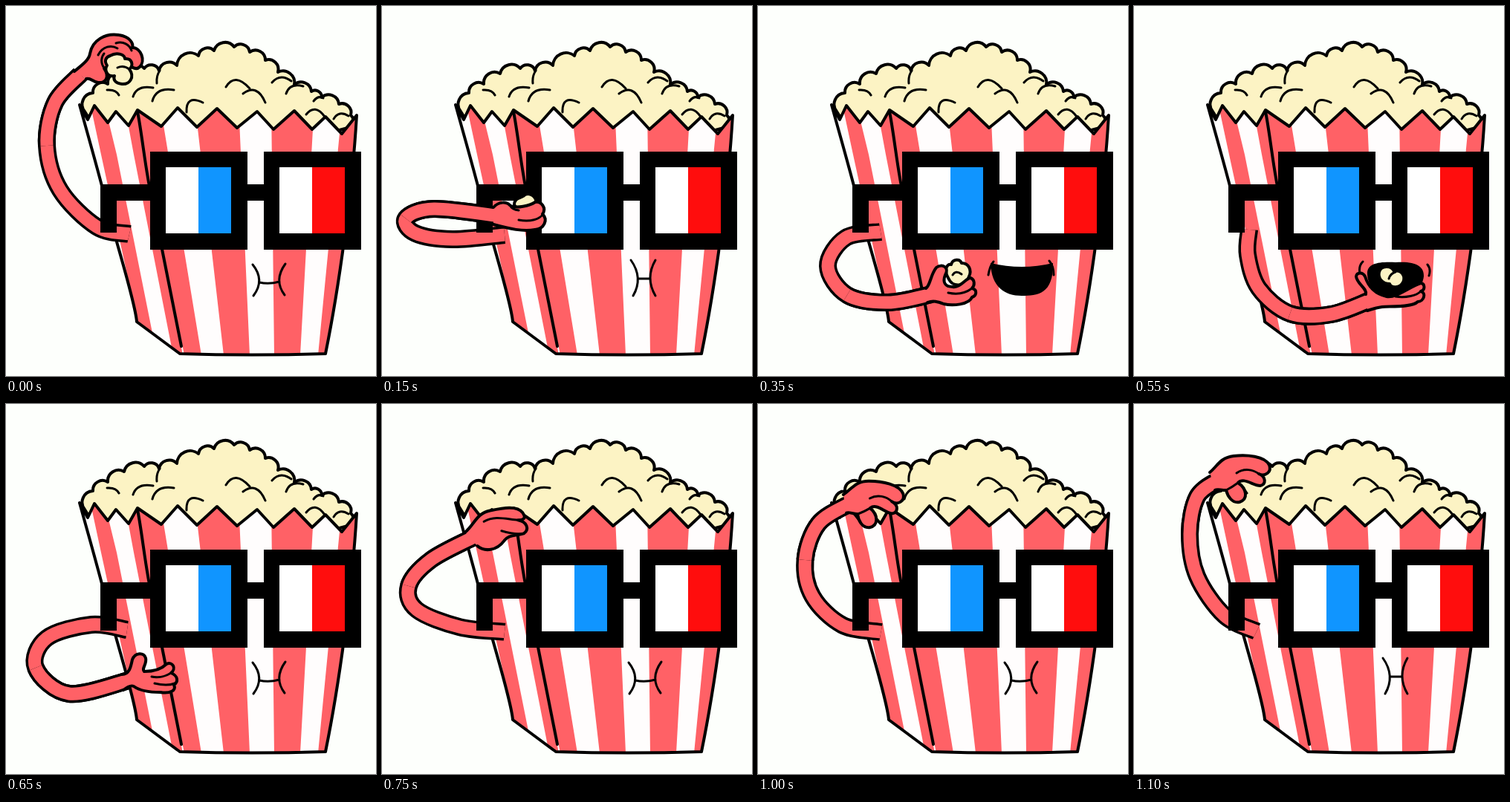
These frames come from a looping animation (498 by 498 pixels, 1.15 s). An HTML page:

```html
<!DOCTYPE html>
<html lang="en">
<head>
<meta charset="utf-8">
<title>Popcorn snack</title>
<style>
html, body { margin: 0; width: 100%; height: 100%; overflow: hidden; background: #fdfffc; }
svg { display: block; width: 100vw; height: 100vh; }
.ink { fill: none; stroke: #000; stroke-width: 4; stroke-linecap: round; stroke-linejoin: round; }
.fine { stroke-width: 3; }
.pink { fill: #ff6166; }
.corn { fill: #fcf3c4; }
.limb { fill: none; stroke: #ff6166; stroke-width: 17; }
.edge { fill: none; stroke: #000; stroke-width: 24; }
</style>
</head>
<body>
<svg viewBox="0 0 498 498">
  <defs>
    <clipPath id="box"><path id="boxShape" d="M99 133L110 153L119 134L137 157L148 142L165 161L177 140L209 162L231 137L257 163L284 138L311 164L338 142L360 166L388 141L412 166L430 149L452 172L472 147C466 250 448 380 430 468Q330 471 234 468L176 425C174 400 152 330 140 285C128 235 112 180 99 133Z"/></clipPath>
  </defs>
  <path id="pile" class="ink corn"/>
  <path class="ink fine" d="M136 113Q148 112 152 120M171 122Q176 106 198 110M197 128Q202 109 226 113M203 104Q202 94 207 87M296 109Q308 89 328 111M319 118Q338 104 349 130M358 103Q369 90 384 101M377 118Q382 103 400 108M243 143Q242 119 265 130M404 146Q416 131 429 149M414 128Q420 120 427 124M441 152Q448 140 461 148"/>
  <g clip-path="url(#box)">
    <path fill="#fffdfd" d="M90 120H480V480H90Z"/>
    <path class="pink" d="M113 130L128 200L178 430L198 445L149 200L132 130ZM159 130L172 200L224 465L240 470L197 255L177 130ZM177 130H207L263 470H238L197 255ZM254 130H313L328 470H293ZM357 130H415L396 470H361ZM453 130H480V470H420Z"/>
  </g>
  <use href="#boxShape" class="ink"/>
  <path class="ink" d="M177 142C184 178 188 225 197 262L236 458"/>
  <path id="lips" class="ink fine"/>
  <path id="mouth"/>
  <path class="edge" id="armEdge"/><path class="limb" id="arm"/>
  <g id="glasses">
    <path d="M127 240H194V196H325V240H347V196H478V328H347V262H325V328H194V262H149V305H127Z"/>
    <path fill="#fff" d="M215 217H259V306H215ZM368 217H412V306H368Z"/>
    <path fill="#1095ff" d="M259 217H303V306H259Z"/>
    <path fill="#ff0d0d" d="M412 217H456V306H412Z"/>
  </g>
  <path class="edge" id="foreEdge"/><path class="limb" id="fore"/>
  <g id="hand">
    <path id="snackBack" class="ink corn"/>
    <path id="palm" class="ink pink"/>
    <path id="snackFront" class="ink corn"/>
    <path id="creases" class="ink fine"/>
  </g>
</svg>
<script>
const STEP = 50, STEPS = 23;
const part = id => document.getElementById(id);
const draw = (id, d) => part(id).setAttribute('d', d || '');

// Rounded bumps along the top of the popcorn pile.
const bumps = [[117, 117], [137, 105], [159, 91], [186, 84], [206, 87], [230, 80], [259, 67], [280, 60],
  [307, 55], [328, 62], [349, 73], [366, 89], [388, 106], [411, 115], [425, 123], [448, 132], [464, 147], [460, 164]];
let last = [106, 142];
draw('pile', 'M106 142' + bumps.map(p => {
  const r = Math.hypot(p[0] - last[0], p[1] - last[1]) * 0.56;
  last = p;
  return `A${r} ${r} 0 0 1 ${p}`;
}).join('') + 'L400 180L120 165Z');

// Arm centre line from shoulder to wrist, at each key step.
const poses = [
  [0, [166, 307, 122, 297, 73, 248, 55, 188, 66, 130, 100, 92]],
  [3, [165, 308, 95, 314, 45, 306, 32, 286, 70, 273, 160, 283]],
  [7, [165, 304, 118, 312, 94, 350, 120, 389, 175, 399, 234, 388]],
  [11, [155, 301, 153, 335, 168, 380, 210, 414, 265, 415, 318, 396]],
  [13, [163, 304, 115, 297, 55, 315, 40, 355, 85, 390, 165, 372]],
  [16, [166, 308, 100, 302, 43, 258, 34, 190, 56, 120, 100, 84]],
  [18, [166, 308, 105, 310, 62, 286, 52, 245, 78, 197, 135, 165]],
  [22, [165, 306, 122, 285, 85, 232, 75, 175, 85, 125, 112, 103]],
  [23, [166, 307, 122, 297, 73, 248, 55, 188, 66, 130, 100, 92]]
];

// Each hand is drawn for one key pose and follows the wrist from there.
const hands = [
  { until: 1, pose: 0,
    palm: 'M92 88C104 78 112 72 113 64C116 46 134 36 152 39C166 41 172 50 170 56C182 56 188 74 180 82C174 88 166 80 162 76L132 84C140 96 134 104 124 103C116 102 114 96 108 98',
    front: 'M140 67C150 61 160 66 160 71C170 70 172 80 166 85C174 96 166 106 156 105C146 104 144 98 146 94C136 96 132 86 136 80C132 74 134 69 140 67Z',
    creases: 'M124 66C130 54 142 52 150 57M148 50C158 47 166 52 169 60M132 64C126 72 129 81 134 85M150 83Q158 79 166 85' },
  { until: 4, pose: 1,
    palm: 'M150 271C158 262 168 264 172 268C180 274 200 268 206 264C214 262 222 272 216 280C224 288 218 300 206 301C190 304 172 300 150 294',
    back: 'M178 268C178 258 186 259 190 256C196 250 206 254 208 264C204 274 186 278 178 268Z',
    creases: 'M184 288C200 291 212 287 217 280M172 268Q175 274 184 275' },
  { until: 8, pose: 2,
    palm: 'M226 380C232 376 232 362 240 352C248 346 258 352 252 362C248 372 252 378 262 378C272 380 280 366 286 366C292 368 292 376 288 380C296 382 294 390 288 392C284 402 262 404 250 401C242 398 236 396 228 399',
    back: 'M256 366C250 356 254 346 260 348C262 340 272 340 274 346C284 346 288 356 284 364C280 378 262 380 256 366Z',
    creases: 'M256 386C270 389 280 386 288 380M262 362Q266 355 274 361' },
  { until: 11, pose: 3,
    palm: 'M312 388C314 380 300 374 299 364C300 358 308 358 311 364C316 380 326 388 340 391C352 394 374 376 386 373C392 374 392 382 386 384C394 386 390 398 382 398C374 406 344 404 334 405C326 406 320 408 314 410',
    back: 'M330 358C332 350 346 348 350 357C360 354 366 364 362 372C358 380 346 380 344 374C334 374 328 366 330 358Z',
    creases: 'M352 391C366 393 380 390 386 384M343 367Q345 360 352 358' },
  { until: 14, pose: 4,
    palm: 'M156 364C166 364 168 354 170 344C174 334 186 334 188 342C190 350 182 356 186 360C196 360 208 358 216 350C224 346 230 356 222 362C232 366 232 374 226 378C230 386 220 390 208 388C192 388 180 386 172 380C168 378 164 380 158 385',
    creases: 'M196 367C206 369 216 366 222 362M200 376C212 379 222 378 227 376' },
  { until: 19, pose: 6,
    palm: 'M125 158C138 146 140 132 158 128C176 124 194 120 202 130C208 138 202 140 196 140C208 142 212 152 204 158C190 162 184 160 178 168C168 182 152 184 142 176',
    creases: 'M150 143C164 134 180 139 196 140M174 155C188 159 198 159 204 158' },
  { until: 22, pose: 7,
    palm: 'M102 92C112 84 116 72 134 70C152 68 176 70 182 82C186 92 176 98 168 94C178 98 178 108 170 110C160 110 148 98 140 106C152 114 154 128 142 132C132 134 126 124 124 116C116 116 112 114 109 116',
    creases: 'M138 93C148 86 160 88 168 94M124 116Q132 112 140 106' }
];

function armAt(step) {
  const k = poses.findIndex(p => p[0] > step);
  const [a, from] = poses[k - 1], [b, to] = poses[k];
  const u = (step - a) / (b - a);
  return from.map((v, i) => v + (to[i] - v) * u);
}

// Smooth curve through the points, returned as cubic segments.
function curve(flat) {
  const at = i => { const j = 2 * Math.max(0, Math.min(5, i)); return [flat[j], flat[j + 1]]; };
  return [0, 1, 2, 3, 4].map(i => {
    const [p, q, r, s] = [at(i - 1), at(i), at(i + 1), at(i + 2)];
    return 'C' + [0, 1].map(n => q[n] + (r[n] - p[n]) / 6) + ' ' +
      [0, 1].map(n => r[n] - (s[n] - q[n]) / 6) + ' ' + r;
  });
}

const wristAngle = a => Math.atan2(a[11] - a[9], a[10] - a[8]) * 180 / Math.PI;

function drawArm(step) {
  const a = armAt(step), segments = curve(a);
  const whole = `M${a[0]} ${a[1]}` + segments.join('');
  const front = `M${a[6]} ${a[7]}` + segments.slice(3).join('');
  draw('armEdge', whole); draw('arm', whole);
  draw('foreEdge', front); draw('fore', front);

  const h = hands.find(v => step <= v.until), home = poses[h.pose][1];
  draw('palm', h.palm); draw('creases', h.creases);
  draw('snackBack', h.back); draw('snackFront', h.front);
  part('hand').setAttribute('transform',
    `translate(${a[10]} ${a[11]}) rotate(${wristAngle(a) - wristAngle(home)}) translate(${-home[10]} ${-home[11]})`);
}

function drawMouth(step) {
  let lips, mouth = '';
  if (step >= 5 && step <= 8) {
    const open = Math.min(1, (step - 4) / 3), low = 352 + 50 * open;
    mouth = `M313 346Q355 356 397 346C398 ${low - 14} 376 ${low - 12} 355 ${low - 12}C332 ${low - 12} 314 ${low - 24} 313 346Z`;
    lips = 'M310 362Q312 350 317 344M392 343Q398 350 398 362';
  } else if (step >= 9 && step <= 11) {
    mouth = 'M314 360C314 346 330 344 352 345C378 343 391 350 390 364C388 382 372 391 352 391C328 391 314 378 314 360Z';
    lips = 'M308 344Q302 350 304 360M395 348Q400 354 397 363';
  } else {
    const beat = (step < 5 ? step + STEPS : step) % 4;
    lips = beat === 2
      ? 'M335 342Q352 366 338 390M368 342Q354 366 368 390M345 367H361'
      : 'M332 348Q349 369 333 390M376 347Q360 369 375 389M341 372Q354 375 368 371';
  }
  draw('lips', lips); draw('mouth', mouth);
}

const start = performance.now();
function tick() {
  const step = Math.floor((performance.now() - start) / STEP) % STEPS;
  drawArm(step);
  drawMouth(step);
  requestAnimationFrame(tick);
}
tick();
</script>
</body>
</html>
```
